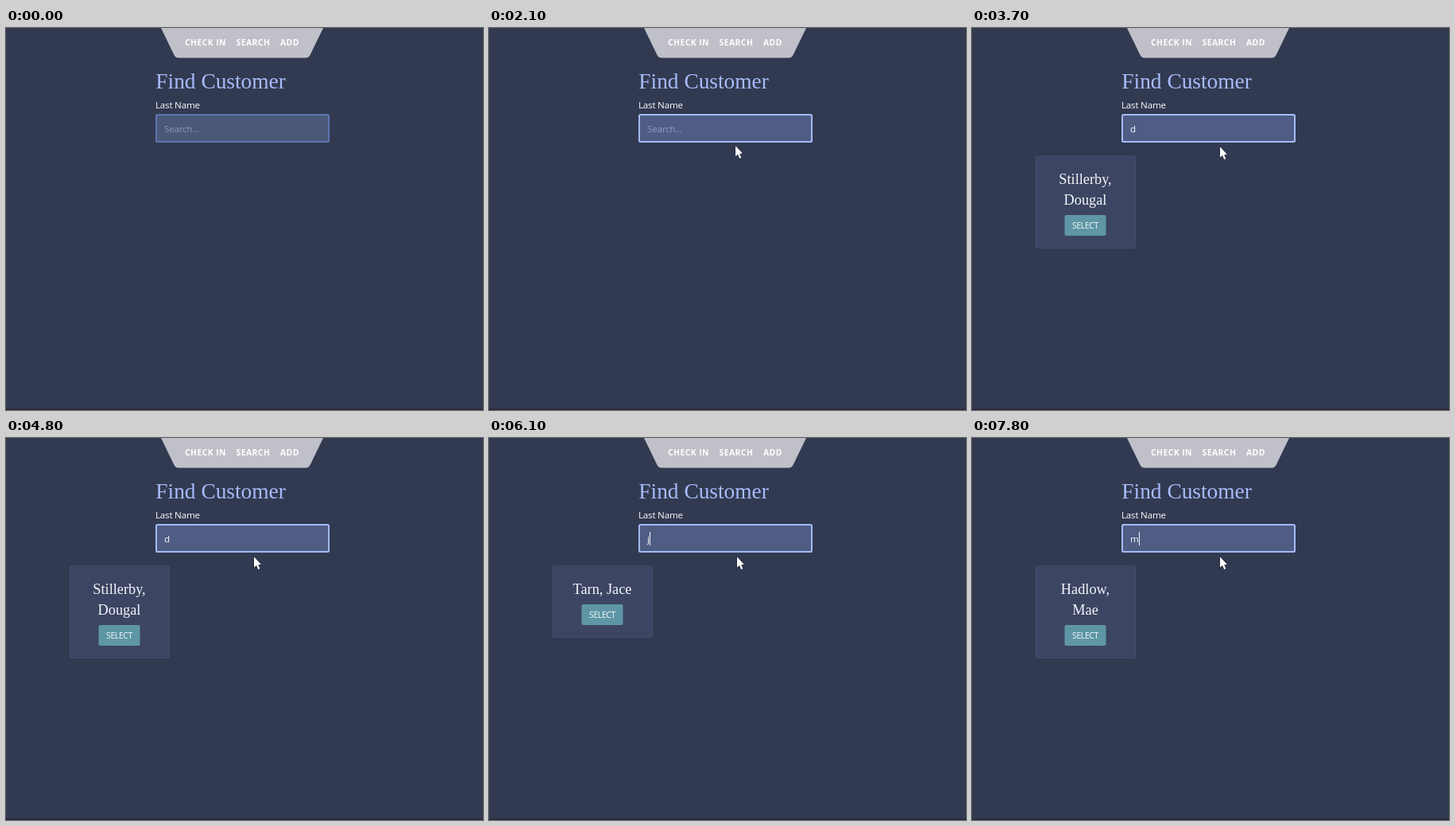
An HTML page with a canvas for the animation above (8 s loop, 600 px wide and 480 px high).

```html
<!DOCTYPE html>
<html lang="en">
<head>
<meta charset="utf-8">
<title>Find Customer</title>
<style>
html, body { margin: 0; width: 100%; height: 100%; overflow: hidden; background: #323a51; }
canvas { display: block; }
</style>
</head>
<body>
<canvas id="stage" width="600" height="480"></canvas>
<script>
const ctx = document.getElementById('stage').getContext('2d');
const LOOP = 8000;
const SANS = '"Open Sans", "Noto Sans", sans-serif';
const SERIF = '"Liberation Serif", "Times New Roman", serif';

const FOCUS_AT = 1500;
const customers = {
  d: ['Stillerby,', 'Dougal'],
  j: ['Tarn, Jace'],
  m: ['Hadlow,', 'Mae']
};

// [start, value]
const typed = [[0, ''], [3200, 'd'], [5100, ''], [6100, 'j'], [7400, ''], [7700, 'm']];
const caret = [
  [0, false], [1500, true], [2000, false], [2500, true], [3100, false],
  [3200, true], [3700, false], [4200, true], [4800, false], [5300, true],
  [5800, false], [6100, true], [6700, false], [7200, true]
];

function valueAt(track, t) {
  let value = track[0][1];
  for (const [start, v] of track) if (t >= start) value = v;
  return value;
}

const clamp = v => Math.max(0, Math.min(1, v));
const mix = (a, b, p) => `rgb(${a.map((v, i) => Math.round(v + (b[i] - v) * p)).join(',')})`;

function text(str, x, y, font, color, spacing = 0, align = 'left') {
  ctx.font = font;
  ctx.letterSpacing = spacing + 'px';
  ctx.textAlign = align;
  ctx.fillStyle = color;
  ctx.fillText(str, x, y);
}

function box(x, y, w, h, r, color) {
  ctx.fillStyle = color;
  ctx.beginPath();
  ctx.roundRect(x, y, w, h, r);
  ctx.fill();
}

function polygon(points) {
  ctx.beginPath();
  points.forEach(([x, y]) => ctx.lineTo(x, y));
  ctx.closePath();
}

function drawNav() {
  ctx.fillStyle = '#bfc0c8';
  ctx.beginPath();
  ctx.moveTo(195, 0);
  ctx.lineTo(211, 33);
  ctx.quadraticCurveTo(213, 37.5, 217, 37.5);
  ctx.lineTo(377, 37.5);
  ctx.quadraticCurveTo(381, 37.5, 383, 33);
  ctx.lineTo(399, 0);
  ctx.fill();
  const font = `bold 10.4px ${SANS}`;
  text('CHECK IN', 225, 22, font, '#fff', 0.42);
  text('SEARCH', 289.6, 22, font, '#fff', 0.42);
  text('ADD', 345, 22, font, '#fff', 0.42);
}

function drawField(t, value) {
  const p = t < FOCUS_AT ? 0 : clamp(0.6 + (t - FOCUS_AT) / 500);
  box(188, 108, 219, 36, 2.5, mix([94, 117, 176], [164, 187, 248], p));
  box(190, 110, 215, 32, 1, mix([74, 89, 122], [79, 92, 132], p));
  const font = `11.6px ${SANS}`;
  if (value) text(value, 199, 131, font, '#fff', -0.2);
  else text('Search...', 199, 131, font, mix([139, 152, 184], [146, 157, 194], p), -0.2);
  if (valueAt(caret, t)) {
    ctx.font = font;
    const x = Math.round(199 + (value ? ctx.measureText(value).width : 0));
    ctx.fillStyle = '#f2f4fc';
    ctx.fillRect(x, 118, 1, 17);
  }
}

function drawCard(lines) {
  const drop = (lines.length - 1) * 26;
  box(80, 160.5, 126, 90.5 + drop, 2.5, '#424e6c');
  box(81, 161.5, 124, 88.5 + drop, 1.5, '#3c4562');
  lines.forEach((line, i) =>
    text(line, 142.5, 196 + i * 26, `18.3px ${SERIF}`, '#f4f5fb', 0, 'center'));
  box(116.5, 209 + drop, 52, 26, 2, '#5f96a5');
  text('SELECT', 142.5, 226 + drop, `10.4px ${SANS}`, '#f6fafb', -0.35, 'center');
}

function drawBeam(x, y) {
  ctx.fillStyle = '#b9bac0';
  ctx.fillRect(x, y - 6, 1, 13);
  ctx.fillRect(x - 3, y - 6, 3, 1);
  ctx.fillRect(x + 1, y - 6, 3, 1);
  ctx.fillRect(x - 3, y + 6, 3, 1);
  ctx.fillRect(x + 1, y + 6, 3, 1);
}

function drawArrow(x, y) {
  ctx.save();
  ctx.translate(x, y);
  polygon([[0, 0], [0, 13.5], [3, 10.8], [5.2, 16], [7.4, 15], [5.2, 10], [9, 9.6]]);
  ctx.lineWidth = 1.2;
  ctx.strokeStyle = '#1d2233';
  ctx.stroke();
  ctx.fillStyle = '#fff';
  ctx.fill();
  ctx.restore();
}

function drawPointer(t) {
  if (t < FOCUS_AT) return;
  if (t < 2000) return drawBeam(304, 140);
  const p = clamp((t - 2000) / 150);
  drawArrow(306 + 6 * p, 145 + 4.3 * p);
}

function draw(t) {
  const value = valueAt(typed, t);
  ctx.fillStyle = '#323a51';
  ctx.fillRect(0, 0, 600, 480);
  ctx.fillStyle = '#292c40';
  ctx.fillRect(0, 478, 600, 2);
  drawNav();
  text('Find Customer', 188.3, 76, `27.4px ${SERIF}`, '#a8bbfb');
  text('Last Name', 188, 101, `11.6px ${SANS}`, '#fff', -0.2);
  drawField(t, value);
  if (customers[value]) drawCard(customers[value]);
  drawPointer(t);
}

const start = performance.now();
function tick() {
  draw((performance.now() - start) % LOOP);
  requestAnimationFrame(tick);
}
tick();
</script>
</body>
</html>
```
